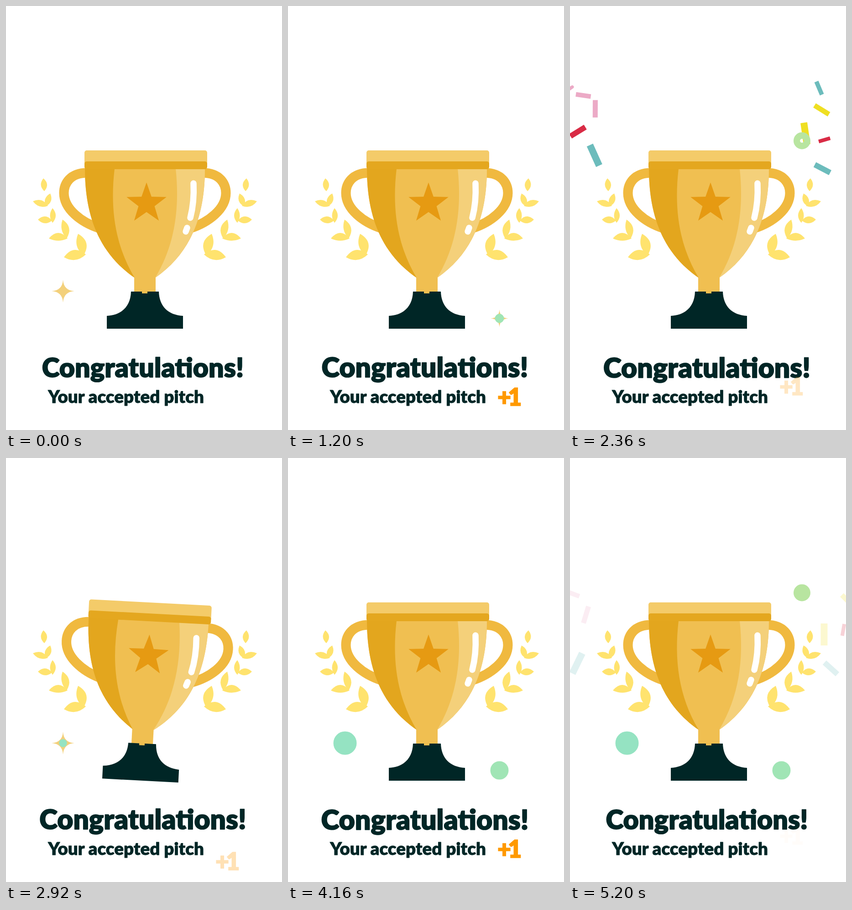
Animation, 605 px wide and 925 px high, one loop 5240 ms. Source, as an HTML page:

```html
<!DOCTYPE html>
<html lang="en">
<head>
<meta charset="utf-8">
<title>Congratulations</title>
<style>
  html, body { margin: 0; width: 100%; height: 100%; overflow: hidden; background: #fff; }
  svg { display: block; width: 605px; height: 925px; }
  text { font-family: Lato, "Open Sans", sans-serif; font-weight: 900; }
  .ink { fill: #002626; stroke: #002626; stroke-linejoin: round; }
</style>
</head>
<body>
<svg viewBox="0 0 605 925">
  <defs>
    <path id="handle" d="M178 364C140 364 127 388 127 408C127 443 165 472 205 485"
          fill="none" stroke="#f0b93f" stroke-width="21"/>
    <g id="branch" fill="#ffe36e"></g>
  </defs>
  <g id="confetti"></g>
  <use href="#branch"/>
  <use href="#branch" transform="translate(609) scale(-1 1)"/>
  <g id="sparkles"></g>
  <g id="trophy">
    <use href="#handle"/>
    <use href="#handle" transform="translate(609) scale(-1 1)"/>
    <rect x="281" y="585" width="47" height="43" fill="#f0bf51"/>
    <path fill="#f0bf51" d="M173 350V355C173 460 205 540 282 593H327C404 540 436 460 436 355V350Z"/>
    <path fill="#e3a61e" d="M173 350V355C173 460 205 540 282 593C238 520 228 440 238 355V350Z"/>
    <path fill="#f4d07a" d="M436 350V355C436 460 404 540 327 593C371 520 381 440 372 355V350Z"/>
    <rect x="172" y="315" width="269" height="34" rx="5" fill="#f4cb69"/>
    <rect x="172" y="339" width="269" height="17" rx="5" fill="#e4a71f"/>
    <polygon id="star" fill="#e69a12"/>
    <path d="M411 387Q413 428 404 462M397 484L394 492" fill="none" stroke="#fff"
          stroke-width="13.5" stroke-linecap="round"/>
    <path fill="#002626" d="M274 623H298V627H310V623H335C336 655 355 674 388 676V704H221V676C254 674 273 655 274 623Z"/>
  </g>
  <text id="title" class="ink" x="300" y="810" font-size="59" stroke-width="1.6" text-anchor="middle">Congratulations!</text>
  <text class="ink" x="263" y="866" font-size="38.5" stroke-width=".8" text-anchor="middle">Your accepted pitch</text>
  <text id="plus" x="459" y="872" font-size="52" letter-spacing="-7" fill="#ff9900" stroke="#ff9900" stroke-width="1.5">+1</text>
</svg>
<script>
const LOOP = 5240, CYCLE = LOOP / 2, PULSE = LOOP / 3;
const $ = id => document.getElementById(id);
const clamp = v => Math.min(1, Math.max(0, v));
const span = (t, from, to) => clamp((t - from) / (to - from));

function add(parent, tag, attrs) {
  const el = document.createElementNS('http://www.w3.org/2000/svg', tag);
  for (const key in attrs) el.setAttribute(key, attrs[key]);
  return parent.appendChild(el);
}

// Piecewise linear curve through [time, value] keys.
function keyed(keys, t) {
  const i = keys.findIndex(k => k[0] > t);
  if (i < 0) return keys[keys.length - 1][1];
  const [a, b] = [keys[i - 1], keys[i]];
  return a[1] + (b[1] - a[1]) * span(t, a[0], b[0]);
}

// Leaf from tip to base; the two bulges set its sides.
function leaf(x1, y1, x2, y2, b1, b2) {
  const dx = x2 - x1, dy = y2 - y1, len = Math.hypot(dx, dy);
  const side = b => `${(x1 + x2) / 2 + dy / len * b} ${(y1 + y2) / 2 - dx / len * b}`;
  add($('branch'), 'path', { d: `M${x1} ${y1}Q${side(b1)} ${x2} ${y2}Q${side(-b2)} ${x1} ${y1}Z` });
}
leaf(82, 376, 84, 404, 14, 13);
leaf(59, 426, 92, 436, 15, 13);
leaf(97, 409, 87, 437, 14, 13);
leaf(70, 466, 101, 468, 16, 14);
leaf(102, 441, 102, 473, 14, 11);
leaf(94, 507, 135, 507, 24, 10);
leaf(124, 466, 133, 507, 20, 13);
leaf(127, 548, 175, 542, 26, 18);
leaf(158, 497, 170, 544, 25, 18);

$('star').setAttribute('points', Array.from({ length: 10 }, (_, i) => {
  const r = i % 2 ? 18.5 : 46, a = i * Math.PI / 5;
  return `${308 + r * Math.sin(a)},${431 - r * Math.cos(a)}`;
}).join(' '));

// Confetti: x, y and angle are given at three moments of the flight.
const MOMENTS = [1760, 2020, 2580], BURST = 1560;
const PINK = '#ecaac6', TEAL = '#6cbcbc', RED = '#d92b45', YELLOW = '#efdf22';
const ribbon = (d, width) => ({ d, width });
const pieces = [
  [PINK, [33, 10], [166, 94, 5], [121, 117, 296], [-24, -10, 20]],
  [PINK, [38, 11], [189, 117, 35], [161, 142, 342], [2, 48, 107]],
  [RED, [38, 12], [132, 80, -20], [196, 192, 380], [65, 20, -60]],
  [TEAL, [49, 15], [190, 125, 16], [228, 228, 448], [104, 166, 296]],
  [PINK, ribbon('M-43 2Q-8 -25 43 0', 7), [237, 108, -70], [188, 147, 330], [47, -14, -70]],
  [TEAL, [31, 9.5], [365, 430, 640], [123, 103, 290], [56, 158, 278]],
  [YELLOW, [37, 11], [431, 477, 609], [142, 152, 312], [124, 171, 225]],
  [YELLOW, [48, 15], [392, 448, 557], [190, 192, 385], [0, 46, 90]],
  [RED, [26, 8], [479, 507, 599], [211, 220, 375], [100, -50, -260]],
  [TEAL, [38, 12], [457, 507, 572], [257, 266, 459], [116, 165, 222]],
  [TEAL, ribbon('M-33 0C-30 -14 -16 -14 -4 -1S18 11 33 0', 9), [383, 519, 670], [198, 142, 320], [-67, 9, 90]],
].map(([color, shape, ...path]) => {
  const el = shape.d
    ? add($('confetti'), 'path', { d: shape.d, fill: 'none', stroke: color, 'stroke-width': shape.width, 'stroke-linecap': 'round' })
    : add($('confetti'), 'rect', { x: -shape[0] / 2, y: -shape[1] / 2, width: shape[0], height: shape[1], fill: color });
  return { el, path };
});

// Parabola through the values at the three moments.
function arc([a, b, c], t) {
  const [p, q, r] = MOMENTS;
  const s1 = (b - a) / (q - p), s2 = (c - b) / (r - q);
  return a + s1 * (t - p) + (s2 - s1) / (r - p) * (t - p) * (t - q);
}

function drawConfetti(t) {
  $('confetti').setAttribute('opacity', t < BURST ? 0 : span(t, 2640, 2360));
  const out = 1 - (1 - span(t, BURST, 1700)) ** 2;
  for (const { el, path } of pieces) {
    const [x, y, angle] = path.map(values => arc(values, t));
    el.setAttribute('transform',
      `translate(${306 + (x - 306) * out} ${325 + (y - 325) * out}) rotate(${angle})`);
  }
}

const sparkles = [
  { x: 125, y: 622, r: 25.5, on: -150, grow: 150, color: '#95e3c2' },
  { x: 463.5, y: 681.5, r: 20, on: 830, grow: 980, color: '#a0e5b5' },
  { x: 508.5, y: 294, r: 18.5, on: 1700, grow: 1850, color: '#b8e5a0' },
].map(s => {
  const g = add($('sparkles'), 'g', { transform: `translate(${s.x} ${s.y})` });
  s.star = add(g, 'path', { fill: '#f3d07b', d: 'M0 -1Q.06 -.06 1 0Q.06 .06 0 1Q-.06 .06 -1 0Q-.06 -.06 0 -1Z' });
  s.dot = add(g, 'circle', { fill: 'none', stroke: s.color });
  return s;
});

// A dot swells over each star; on the first pass it then opens into a ring and vanishes.
function drawSparkle(s, t, firstPass) {
  const full = s.grow + 440;
  const radius = s.r * span(t, s.grow, full);
  const hole = firstPass ? radius * span(t, full, full + 300) : 0;
  const size = t < full ? (s.r - .7) * span(t, s.on, s.on + 80) : 0;
  s.star.setAttribute('transform', `scale(${size})`);
  s.dot.setAttribute('r', (radius + hole) / 2);
  s.dot.setAttribute('stroke-width', radius - hole);
}

const SWING = [[0, 0], [205, 5.2], [430, 0], [580, -2.8], [740, -1.3], [900, 0]];

function draw(now) {
  const time = now % LOOP, t = time % CYCLE;

  const squash = 1 - .036 * Math.sin(Math.PI * span(t, BURST, 1960));
  $('trophy').setAttribute('transform',
    `translate(306 509.5) rotate(${keyed(SWING, t)}) scale(1 ${squash}) translate(-306 -509.5)`);

  const pulse = 1 + .038 * (1 - Math.abs(1 - 2 * (time % PULSE) / PULSE));
  $('title').setAttribute('transform', `translate(300 790) scale(${pulse}) translate(-300 -790)`);

  const enter = span(t, 0, 1040), leave = span(t, 1560, 2600);
  $('plus').setAttribute('transform', `translate(0 ${38 * (1 - enter) - 30 * leave})`);
  $('plus').setAttribute('opacity', enter * (1 - leave));

  drawConfetti(t);
  sparkles.forEach(s => drawSparkle(s, t, time < CYCLE));
}

let start;
function tick(now) {
  start ??= now;
  draw(now - start);
  requestAnimationFrame(tick);
}
draw(0);
requestAnimationFrame(tick);
</script>
</body>
</html>
```
